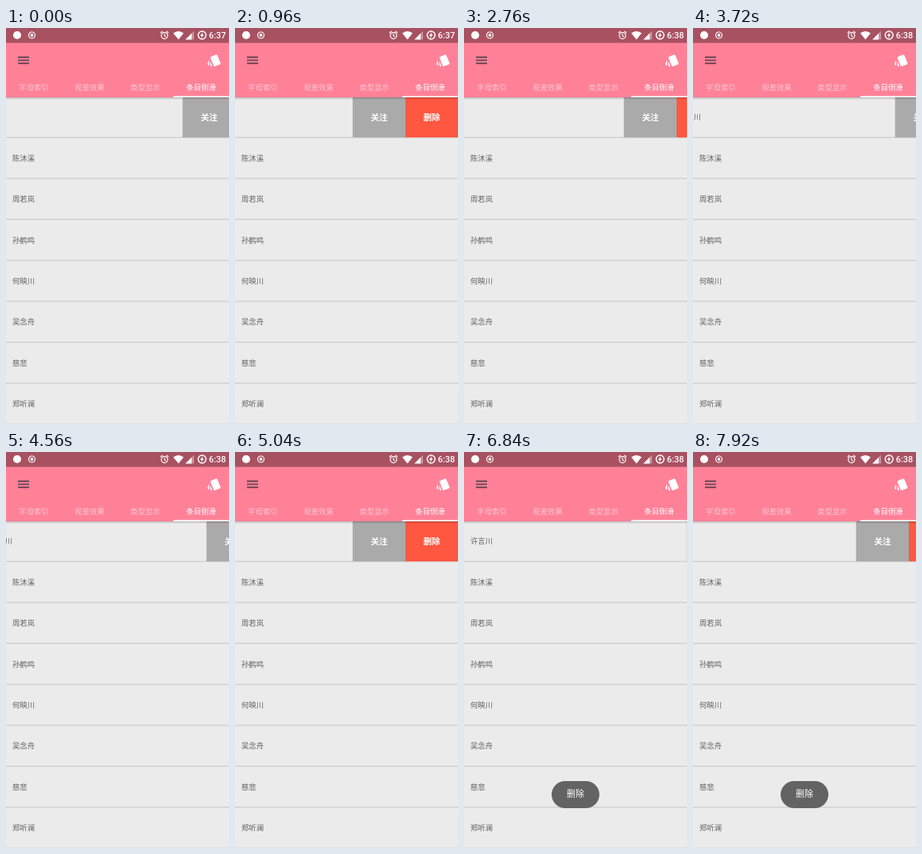
These frames come from a looping animation (280 px wide and 497 px high, 8000 ms). An HTML page:

```html
<!DOCTYPE html>
<html lang="zh-CN">
<head>
<meta charset="utf-8">
<style>
  html, body { margin: 0; width: 100%; height: 100%; overflow: hidden; background: #ebebeb; }
  svg { display: block; width: 280px; height: 497px; }
  text { font: 9.33px "Noto Sans CJK SC", "Noto Sans CJK", sans-serif; }
  .name { fill: #606060; }
  .tab { fill: #fff; text-anchor: middle; }
  .action { fill: #fff; font-size: 10.6px; font-weight: 700; text-anchor: middle; }
  .toast { fill: #fff; font-size: 10.9px; text-anchor: middle; }
  #clock { fill: #fff; font: 500 10.9px Roboto, sans-serif; }
</style>
</head>
<body>
<svg viewBox="0 0 280 497">
  <defs>
    <linearGradient id="shade" x2="0" y2="1">
      <stop stop-opacity=".22"/>
      <stop offset="1" stop-opacity="0"/>
    </linearGradient>
  </defs>
  <rect width="280" height="497" fill="#ebebeb"/>
  <g id="list"></g>
  <g id="slider">
    <text id="first" class="name" x="8" y="115.3">许言川</text>
    <rect x="279.7" y="87" width="66.3" height="50.3" fill="#aaa"/>
    <rect x="346" y="87" width="66" height="50.3" fill="#ff5740"/>
    <text class="action" x="313" y="116">关注</text>
    <text class="action" x="379" y="116">删除</text>
  </g>
  <rect y="87" width="280" height="3" fill="url(#shade)"/>

  <rect width="280" height="87" fill="#ff8198"/>
  <rect width="280" height="18.67" fill="#a85161"/>
  <rect x="210" y="85.4" width="70" height="1.6" fill="#fff"/>
  <g id="tabs"></g>
  <path d="M15 36.6h14M15 40.5h14M15 44.4h14" stroke="#57404a" stroke-width="1.56"/>
  <g fill="#fff" transform="translate(252 31.2) scale(.778)">
    <rect x="-5.9" y="-8" width="11.900" height="16.900" rx="2" transform="translate(14 12) rotate(-22.5)"/>
    <path d="M2.500 19.600l1.400.6v-9l-2.400 5.800q-.8 1.800 1 2.600z"/>
    <path d="M5.900 13.400v6.400q0 2 2 2h1.400z"/>
  </g>

  <g fill="#fff">
    <circle cx="14" cy="9" r="5"/>
    <circle cx="32.500" cy="9" r="1.900"/>
    <path d="M210 6.500q6.500-5 13 0l-6.500 8z"/>
    <path d="M236 3.800v10.700h-10.700z" opacity=".4"/>
    <path d="M233 6.800v7.700h-7.700z"/>
    <path d="M247.300 5l-3.700 4.700h2.200l-1 3.500 3.800-4.900h-2.300z"/>
  </g>
  <g fill="none" stroke="#fff" stroke-width="1.200">
    <circle cx="32.500" cy="9" r="4"/>
    <circle cx="199" cy="9.600" r="4"/>
    <path d="M199 7.200v2.700l1.800 1.100M194 6.200l2.500-2.200M204 6.200l-2.500-2.200"/>
    <circle cx="246.200" cy="9" r="4.900" stroke-width="1.500"/>
  </g>
  <text id="clock" x="254.800" y="13">6:37</text>

  <g id="toast" opacity="0">
    <rect x="110" y="413" width="60" height="34" rx="17" fill="#636363"/>
    <text class="toast" x="140" y="433.300">删除</text>
  </g>
</svg>
<script>
const LOOP = 8000, STEP = 120, ROW = 51.4, TOP = 87;
const $ = id => document.getElementById(id);

const names = ["陈沐溪", "周若岚", "孙鹤鸣", "何映川", "吴念舟", "慈悲", "郑听澜"];
const line = i => `<rect y="${TOP + ROW * i - 1.6}" width="280" height="1.3" fill="#cdcdcd"/>`;
$("list").innerHTML = line(1) + names.map((name, i) =>
  `<text class="name" x="8" y="${TOP + ROW * (i + 1) + 28.3}">${name}</text>` + line(i + 2)).join("");

$("tabs").innerHTML = ["字母索引", "视差效果", "类型显示", "条目侧滑"].map((label, i) =>
  `<text class="tab" x="${35 + 70 * i}" y="78.300" opacity="${i === 3 ? 1 : .55}">${label}</text>`).join("");

// [time, left edge of the swipe buttons]
const drag = [
  [0, 222], [840, 150], [960, 148], [1560, 148], [1800, 216], [2640, 216],
  [2760, 201], [3000, 268], [3120, 272], [3480, 148], [3720, 254], [4200, 254],
  [4440, 278], [5040, 148], [5520, 148], [5760, 236], [5880, 236], [6000, 266],
  [6240, 280], [7200, 280], [7920, 205], [LOOP, 205]
];

function edgeAt(t) {
  const i = drag.findIndex(([time]) => time > t);
  const [t0, x0] = drag[i - 1], [t1, x1] = drag[i];
  return x0 + (x1 - x0) * (t - t0) / (t1 - t0);
}

function draw(now) {
  const t = Math.floor(now % LOOP / STEP) * STEP;
  $("slider").setAttribute("transform", `translate(${Math.round(edgeAt(t)) - 280})`);
  $("clock").textContent = t < 1680 ? "6:37" : "6:38";
  $("toast").setAttribute("opacity", Math.min(1, Math.max(0, (t - 6360) / 480)));
  requestAnimationFrame(draw);
}
requestAnimationFrame(draw);
</script>
</body>
</html>
```
